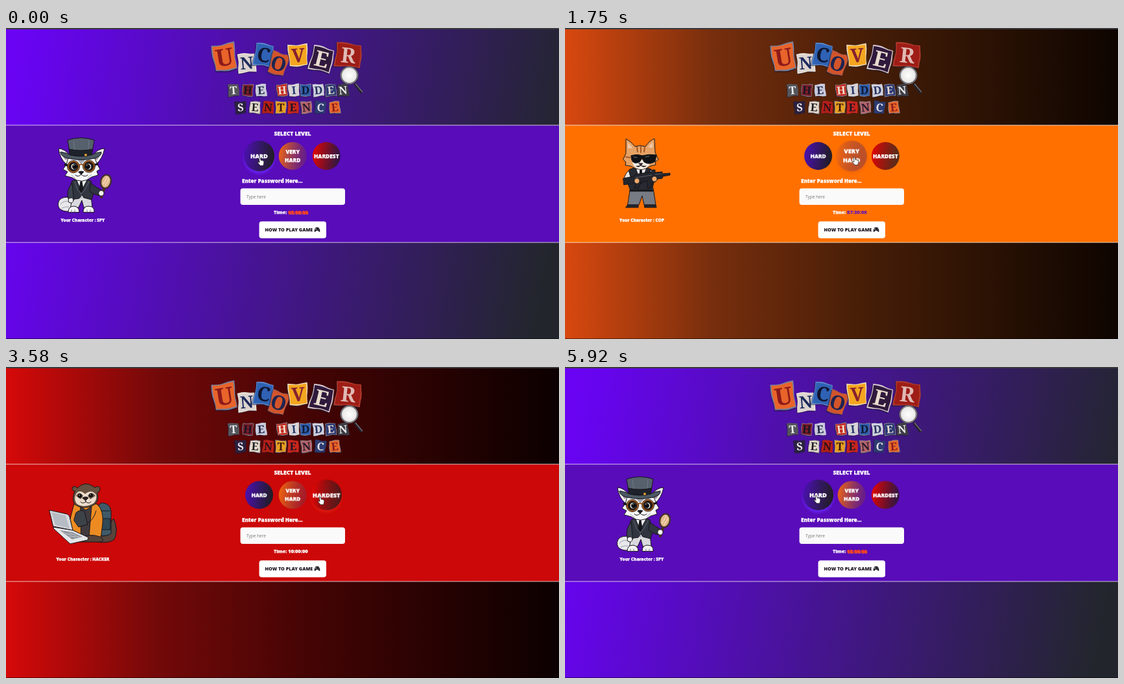
An HTML page that plays this animation: 853x480 px, repeating every 6000 ms.

```html
<!DOCTYPE html>
<html lang="en">
<head>
<meta charset="utf-8">
<title>Select level</title>
<style>
html, body { margin: 0; width: 100%; height: 100%; overflow: hidden; background: #000; }
svg { display: block; width: 100vw; height: 100vh; }
text { font-family: "Open Sans", "Noto Sans", sans-serif; font-weight: 800; fill: #fff; text-anchor: middle; }
.cut { font-family: "Noto Serif", "DejaVu Serif", serif; font-weight: 900; }
.left { text-anchor: start; }
.label { font-size: 6.5px; }
.time { font-size: 7.5px; text-anchor: start; }
.bold { stroke: #fff; stroke-width: .25; }
.line { stroke: #16161c; stroke-width: 1; stroke-linejoin: round; stroke-linecap: round; }

.theme { animation: 6s step-end infinite; }
.spy { animation-name: spy; }
.cop { animation-name: cop; }
.hacker { animation-name: hacker; }
@keyframes spy { 0% { opacity: 1 } 13.83% { opacity: 0 } 94.5% { opacity: 1 } }
@keyframes cop { 0% { opacity: 0 } 13.83% { opacity: 1 } 43% { opacity: 0 } 65.83% { opacity: 1 } 94.5% { opacity: 0 } }
@keyframes hacker { 0% { opacity: 0 } 43% { opacity: 1 } 65.83% { opacity: 0 } }

.btn, .glow { animation: 6s ease infinite; }
.btn text { font-size: 8.4px; }
.b1 .btn { animation-name: grow1; }
.b2 .btn { animation-name: grow2; }
.b3 .btn { animation-name: grow3; }
.b1 .glow { animation-name: glow1; }
.b2 .glow { animation-name: glow2; }
.b3 .glow { animation-name: glow3; }
@keyframes grow1 { 0%, 12.8% { transform: scale(1.1) } 15.2%, 82.8% { transform: none } 85.3%, 100% { transform: scale(1.1) } }
@keyframes grow2 { 0%, 8% { transform: none } 10.5%, 38.8% { transform: scale(1.1) } 41.3%, 61.5% { transform: none } 64%, 92.8% { transform: scale(1.1) } 95.2%, 100% { transform: none } }
@keyframes grow3 { 0%, 31.5% { transform: none } 34%, 64.2% { transform: scale(1.1) } 66.7%, 100% { transform: none } }
@keyframes glow1 { 0%, 12.8% { opacity: .9 } 15.2%, 82.8% { opacity: 0 } 85.3%, 93% { opacity: .3 } 95%, 100% { opacity: .9 } }
@keyframes glow2 { 0%, 8% { opacity: 0 } 10.5%, 38.8% { opacity: .6 } 41.3%, 61.5% { opacity: 0 } 64%, 92.8% { opacity: .6 } 95.2%, 100% { opacity: 0 } }
@keyframes glow3 { 0%, 31.5% { opacity: 0 } 34%, 64.2% { opacity: .6 } 66.7%, 100% { opacity: 0 } }

.hand { animation: point 6s ease-in-out infinite; }
@keyframes point {
  0%, 4.17% { transform: translate(393px, 206px) }
  10%, 26.67% { transform: translate(435px, 205px) }
  34.2%, 58.33% { transform: translate(490px, 205px) }
  59.67% { transform: translate(486px, 206px) }
  63.67%, 81.67% { transform: translate(443px, 205px) }
  85.3%, 91.67% { transform: translate(396px, 203px) }
  95%, 100% { transform: translate(389px, 204px) }
}
</style>
</head>
<body>
<svg viewBox="0 0 853 480" preserveAspectRatio="none">
<defs>
  <linearGradient id="violet" gradientUnits="userSpaceOnUse" x1="0" y1="0" x2="909" y2="160">
    <stop stop-color="#6b03f5"/><stop offset=".06" stop-color="#6604ee"/><stop offset=".96" stop-color="#22262c"/>
  </linearGradient>
  <linearGradient id="amber">
    <stop stop-color="#d8480f"/><stop offset=".27" stop-color="#762e0d"/><stop offset=".55" stop-color="#451d07"/><stop offset="1" stop-color="#0e0500"/>
  </linearGradient>
  <linearGradient id="crimson">
    <stop stop-color="#d60909"/><stop offset=".27" stop-color="#740909"/><stop offset=".55" stop-color="#440404"/><stop offset="1" stop-color="#0c0000"/>
  </linearGradient>
  <linearGradient id="hard" y2=".15"><stop stop-color="#4d10b8"/><stop offset="1" stop-color="#221d28"/></linearGradient>
  <linearGradient id="very" y2=".15"><stop stop-color="#fb6c0a"/><stop offset="1" stop-color="#7a3550" stop-opacity=".45"/></linearGradient>
  <linearGradient id="hardest" y2=".15"><stop offset=".1" stop-color="#dc0606"/><stop offset="1" stop-color="#2a1a20" stop-opacity=".78"/></linearGradient>
  <radialGradient id="lens"><stop stop-color="#fff"/><stop offset=".75" stop-color="#ecebea"/><stop offset="1" stop-color="#c9c6c4"/></radialGradient>
  <filter id="soft" x="-50%" y="-50%" width="200%" height="200%"><feGaussianBlur stdDeviation="2.5"/></filter>
</defs>

<g class="theme spy">
  <rect width="853" height="480" fill="url(#violet)"/>
  <rect y="150" width="853" height="181" fill="#590cb9"/>
  <g class="line">
    <path d="M101 262Q88 259 82 266Q78 275 84 280Q92 285 102 282Z" fill="#e9e9ec"/>
    <path d="M84 272Q89 266 96 268M86 278Q91 275 97 276" stroke="#9a9aa6" fill="none"/>
    <path d="M103 258H131L133 277H120L117 266L112 277H100Z" fill="#d9d9de"/>
    <path d="M102 236Q116 229 131 236L135 255L132 265L120 262L117 257L113 263L100 265L97 254Z" fill="#30353f"/>
    <path d="M109 235L116 252L125 235Z" fill="#f0f0f2"/>
    <path d="M115 237L113 249L116 254L119 249L117 237Z" fill="#15171d"/>
    <path d="M106 237L110 249L116 256L122 249L128 237M116 256V262" fill="none" stroke="#5f6774"/>
    <path d="M131 240Q140 246 148 251L144 259Q135 257 129 252Z" fill="#30353f"/>
    <path d="M102 240Q93 248 96 264L104 265Z" fill="#3d434f"/>
    <circle cx="100" cy="266" r="4" fill="#f4f4f5"/>
    <path d="M96 284Q96 275 105 275Q113 276 113 284ZM119 284Q119 275 127 275Q137 275 136 284Z" fill="#f4f4f5"/>
    <path d="M101 281v3M106 281v3M125 281v3M130 281v3" stroke="#777781"/>
    <path d="M93 210Q83 202 81 186Q90 186 100 198ZM139 210Q149 202 152 186Q142 186 132 198Z" fill="#f4f4f5"/>
    <path d="M92 204Q86 197 85 190Q91 192 97 199ZM140 204Q146 197 148 190Q142 192 135 199Z" fill="#9b8d98" stroke="none"/>
    <path d="M96 201H137L141 211L145 218L140 221L142 227L132 230Q117 242 102 231L91 228L95 222L88 218L93 211Z" fill="#f7f7f8"/>
    <path d="M110 203L116 210L122 203ZM101 227L107 232M132 226L126 231" fill="#a3a6b0" stroke="#a3a6b0"/>
    <path d="M99 197L95 173Q116 166 136 173L132 197Z" fill="#56616d"/>
    <path d="M104 174L106 188M128 173L127 187" stroke="#6f7a86"/>
    <path d="M97.500 187Q115 191 133.500 187L132 197H99Z" fill="#1d222b"/>
    <path d="M84 192Q90 191 99 196Q115 200 132 196Q141 191 147 192Q148 197 137 201Q116 206 95 201Q84 198 84 192Z" fill="#4c5863"/>
    <circle cx="123" cy="196" r="2.5" fill="#e2a83c"/>
    <path d="M91 211L98 213M141 210L134 212" stroke-width="3"/>
    <g fill="#231a15" stroke="#a3591b" stroke-width="2">
      <circle cx="104" cy="214" r="8.3"/><circle cx="128" cy="213.500" r="8.3"/>
      <path d="M112 212Q116 209 120 212" fill="none"/>
    </g>
    <g fill="none" stroke="#17120f" stroke-width=".8"><circle cx="104" cy="214" r="9.600"/><circle cx="128" cy="213.500" r="9.600"/></g>
    <circle cx="105" cy="214" r="5" fill="#f0ece6"/><circle cx="127" cy="214" r="5" fill="#f0ece6"/>
    <circle cx="106" cy="214" r="3.5" fill="#0b0b0d"/><circle cx="126" cy="214" r="3.5" fill="#0b0b0d"/>
    <path d="M104.500 212h.5M124.500 212h.5" stroke="#fff"/>
    <path d="M112 222Q116 220 120 222L116 226Z" fill="#16161c"/>
    <path d="M116 226Q111 231 107 227M116 226Q121 231 126 227" fill="none"/>
    <path d="M152 246L147 261" stroke="#4b2e20" stroke-width="4"/>
    <ellipse cx="154" cy="237" rx="7.8" ry="10.500" fill="#e2b78a" stroke="#40302b" stroke-width="2.4" transform="rotate(15 154 237)"/>
    <path d="M150 241L156 230M153 243L159 233" stroke="#f4dcc0" stroke-width="1.4"/>
    <circle cx="147" cy="255" r="4.2" fill="#f4f4f5"/>
  </g>
  <text class="label bold" x="118.5" y="299">Your Character : SPY</text>
  <text class="time" x="435" y="287" style="fill:#ff3b1c;text-shadow:.8px .8px 1px #ff6a1a">05:00:00</text>
</g>

<g class="theme cop">
  <rect width="853" height="480" fill="url(#amber)"/>
  <rect y="150" width="853" height="181" fill="#ff7000"/>
  <g class="line">
    <path d="M101 247H136L140 273H122L119 259L114 273H97Z" fill="#777b83"/>
    <path d="M97 273H113V277H94ZM123 273H140L141 277H123Z" fill="#25262b"/>
    <path d="M100 218Q116 211 133 218L138 234L134 251H101L95 235Z" fill="#272a31"/>
    <path d="M109 216L117 239L126 216Z" fill="#f1f1f2"/>
    <path d="M116 218L114 236L117 241L120 236L118 218Z" fill="#121318"/>
    <path d="M98 220Q89 229 92 240L104 241ZM132 219Q143 225 139 238L129 235Z" fill="#e9e5df"/>
    <path d="M94 193L94 171Q102 175 108 183Q116 180 124 183Q131 173 138 171L139 192L144 203L139 207L140 211L132 213Q118 224 101 213L93 212L94 207L90 203Z" fill="#e6a265"/>
    <path d="M97 186L97 176L104 185ZM135 185V176L128 184Z" fill="#f0c9ac" stroke="none"/>
    <path d="M104 208Q111 202 117 204Q126 202 132 208Q127 218 116 218Q107 217 104 208Z" fill="#f7efe6" stroke="none"/>
    <path d="M117 183V192M111 184L112 191M123 184L122 191M94 199L100 200M140 198L135 200" stroke="#a85722" stroke-width="2" fill="none"/>
    <path d="M102 197Q111 194 119 197Q130 194 141 196L139 206Q130 212 122 207L119 201L115 207Q106 211 103 204Z" fill="#101115"/>
    <path d="M106 199l5 1M124 199l6-1" stroke="#69717a"/>
    <path d="M114 209H120L117 212ZM117 212Q113 216 110 213M117 212Q121 216 125 213" fill="#3b2320"/>
    <path d="M90 232L106 229L108 226L133 222L135 219H139V223L150 222V225L162 224V227L151 229L150 232L137 234L132 247L127 247L127 236L117 238L113 247H107L109 239L91 242Z" fill="#24262c"/>
    <path d="M109 231L134 227M139 226L149 225" stroke="#5b6069"/>
    <circle cx="111" cy="236" r="4.2" fill="#eda96c"/><circle cx="138" cy="233" r="4.2" fill="#eda96c"/>
    <path d="M101 251H135" stroke="#15161a" stroke-width="3"/>
  </g>
  <text class="label bold" x="118.5" y="299">Your Character : COP</text>
  <text class="time" x="435" y="287" style="fill:#5a10c8">07:30:00</text>
</g>

<g class="theme hacker">
  <rect width="853" height="480" fill="url(#crimson)"/>
  <rect y="150" width="853" height="181" fill="#cc0808"/>
  <g class="line">
    <path d="M144 261Q165 262 161 247Q160 239 166 234Q174 252 167 266Q158 273 141 270Z" fill="#58443c"/>
    <path d="M142 215Q146 207 154 211Q163 214 162 228V257Q156 262 144 260Z" fill="#405a69"/>
    <path d="M146 234H161V251H146ZM147 222H160" fill="#314856"/>
    <path d="M105 212Q122 206 141 212Q151 222 149 242L146 266H106L99 235Z" fill="#ed8b22"/>
    <path d="M115 215L123 221L132 215L128 263H116Z" fill="#403a3f"/>
    <path d="M139 222Q135 237 124 242L118 236" fill="none"/>
    <path d="M116 264Q128 256 145 262Q153 267 147 270H112Z" fill="#574339"/>
    <path d="M106 192Q100 190 103 185Q107 183 110 187Q122 174 137 186Q144 182 145 188Q145 193 141 194Q145 211 131 215Q117 220 106 212Q101 204 106 192Z" fill="#66503f"/>
    <path d="M108 196Q113 188 122 196Q132 188 139 197Q141 208 132 212Q119 218 109 211Q104 204 108 196Z" fill="#ecdccb" stroke="none"/>
    <path d="M108 199Q113 190 119 199L115 204ZM126 199Q132 190 138 199L130 204Z" fill="#6b5344" stroke="none"/>
    <circle cx="114" cy="199" r="2.8" fill="#111"/><circle cx="131" cy="198" r="2.8" fill="#111"/>
    <path d="M113 198h.5M130 197h.5" stroke="#fff"/>
    <path d="M118 202Q123 199 127 202L123 206Z" fill="#2a2021"/>
    <path d="M123 206V208Q118 212 115 208M123 208Q128 212 131 208" fill="none"/>
    <path d="M108 225Q114 219 121 223L126 243L112 247L105 237Z" fill="#3d4248"/>
    <path d="M67 221L94 227Q97 228 98 231L103 252L73 246Z" fill="#d8dade"/>
    <path d="M70 224L92 229L98 249L76 244Z" fill="#b7bbc3" stroke="none"/>
    <path d="M73 247L103 252L127 263L126 267L99 273L74 250Z" fill="#e5e6e9"/>
    <path d="M83 252L103 255L118 262L102 266Z" fill="#8c9099" stroke="none"/>
    <path d="M87 254L108 264M96 255L113 263M90 258L109 258M96 262L116 261" stroke="#d2d4d9" stroke-width=".6"/>
  </g>
  <text class="label bold" x="118.5" y="299">Your Character : HACKER</text>
  <text class="time bold" x="435" y="287">10:00:00</text>
</g>

<path d="M0 150H853M0 331H853" stroke="#fff" stroke-width="1.2" stroke-opacity=".75"/>
<rect width="853" height="2" fill="#3b3b3e"/>
<rect y="479" width="853" height="1" fill="#000" opacity=".5"/>

<g id="title"></g>
<g>
  <path d="M538 86L549 100" stroke="#24222a" stroke-width="4"/>
  <path d="M539 86L550 99" stroke="#77757e" stroke-width="1.2"/>
  <circle cx="529.5" cy="73" r="13" fill="url(#lens)" stroke="#33323a" stroke-width="2.2"/>
  <circle cx="529.5" cy="73" r="13.2" fill="none" stroke="#aaa8ac" stroke-width=".9"/>
</g>

<text class="bold" x="442" y="165.5" font-size="8.5">SELECT LEVEL</text>
<g class="b1" transform="translate(390.5 197.5)">
  <circle class="glow" cy="4" r="23" fill="#6a2bff" filter="url(#soft)" opacity="0"/>
  <g class="btn"><circle r="21.5" fill="url(#hard)"/><text class="bold" y="3">HARD</text></g>
</g>
<g class="b2" transform="translate(442.2 197.5)">
  <circle class="glow" cy="4" r="23" fill="#e65f12" filter="url(#soft)" opacity="0"/>
  <g class="btn"><circle r="21.5" fill="url(#very)"/><text class="bold" y="-4">VERY</text><text class="bold" y="9">HARD</text></g>
</g>
<g class="b3" transform="translate(494.3 197.5)">
  <circle class="glow" cy="4" r="23" fill="#ee2a12" filter="url(#soft)" opacity="0"/>
  <g class="btn"><circle r="21.5" fill="url(#hardest)"/><text class="bold" y="3">HARDEST</text></g>
</g>

<text class="left bold" x="364" y="239" font-size="8.1">Enter Password Here...</text>
<rect x="361.5" y="247.5" width="161.5" height="25.5" rx="4" fill="#fafafa"/>
<text class="left" x="371" y="262.5" style="font-size:6.5px;font-weight:400;fill:#777">Type here</text>
<text class="left bold" x="413" y="287" font-size="7.2">Time:</text>
<rect x="390.5" y="298.5" width="103.5" height="26" rx="4" fill="#fff"/>
<text class="left" x="399.5" y="314" style="font-size:7.2px;fill:#18101c">HOW TO PLAY GAME</text>
<path d="M477.500 308Q480 307 482.500 308Q484.500 311 484.500 314Q483 316 481.500 312.800H478.500Q477 316 475.500 314Q475.500 311 477.500 308Z" fill="#22202a"/>
<path d="M477 310.300h2M478 309.300v2M482 309.500h.5M481.200 311h.5" stroke="#fff" stroke-width=".6"/>

<g class="hand">
  <path d="M-2.800 -5.500Q-1.600 -6.700 -.8 -5.300L.3 -1.500L1.300 -2L2.600 -1.200L3.700 -1.300L4.800 .3Q5.300 3 3.600 6.500H-.6Q-2.300 4.600 -4.300 2.200Q-4.700 .6 -3.200 .9L-2 1.800Z" fill="#fff" stroke="#222" stroke-width=".8" stroke-linejoin="round"/>
</g>
</svg>

<script>
const title = document.getElementById('title');

// Torn paper outline: a rectangle whose edge points wobble by a fixed rule.
function tear(w, h, seed, rough) {
  const pts = [];
  for (let i = 0; i < 20; i++) {
    const a = i / 20 * Math.PI * 2 + Math.PI / 4;
    const c = Math.cos(a), s = Math.sin(a), m = Math.max(Math.abs(c), Math.abs(s));
    const k = 1 + Math.sin(seed * 7 + i * 5.3) * rough;
    pts.push((c / m * w / 2 * k).toFixed(1) + ',' + (s / m * h / 2 * k).toFixed(1));
  }
  return pts.join(' ');
}

function scrap(ch, x, y, w, h, turn, paper, ink, edge) {
  const seed = x + y, size = h * .9;
  const outer = tear(w, h, seed, .07), inner = tear(w * .91, h * .91, seed, .05);
  title.insertAdjacentHTML('beforeend',
    `<g transform="translate(${x} ${y}) rotate(${turn})">
      <polygon points="${outer}" fill="#1c1a30" opacity=".55" transform="translate(-1 ${h / 22})"/>
      <polygon points="${outer}" fill="${edge}"/><polygon points="${inner}" fill="${paper}"/>
      <text class="cut" y="${size * .36}" style="font-size:${size}px;fill:${ink}">${ch}</text>
    </g>`);
}

[
  ['U', 337, 45, 35, 41, -9, '#e8642a', '#8c1a1a', '#78809c'],
  ['N', 371.5, 54, 27, 29, -5, '#ddd4cf', '#1c2a5c', '#eee6dc'],
  ['C', 397.5, 41.5, 28, 34, 9, '#2f62b4', '#10152e', '#5f8ccc'],
  ['O', 420.5, 55, 26, 34, 17, '#d4542a', '#1d2450', '#a8584a'],
  ['V', 450.5, 42, 29, 33, -4, '#f4a51f', '#86202e', '#f0dfc0'],
  ['E', 487, 48, 33, 37, 14, '#30193c', '#e8dccf', '#d9cdd2'],
  ['R', 528, 42, 39, 36, 6, '#9e1d16', '#e0b9b4', '#b03a2c']
].forEach(a => scrap(...a));

const rows = [
  [96, 'THEHIDDEN', [
    [351, '#55555c', '#eeeeee'], [373, '#7c1c2a', '#191522'], [393.500, '#c9cadb', '#1d2444'],
    [426, '#c42a20', '#f0e2d0'], [444, '#d8d4d6', '#22356c'], [462, '#2d5fae', '#12172e'],
    [482, '#cfd0dc', '#24305e'], [501, '#2c3a74', '#e6d9d0'], [520, '#3d3c45', '#f0f0f0']]],
  [122.5, 'SENTENCE', [
    [362, '#2a2140', '#e8e2e6'], [384, '#e4dacb', '#1b1a22'], [404.500, '#b51f18', '#2a1018'],
    [424, '#e9a020', '#38140f'], [443, '#c8261c', '#1c1426'], [463.500, '#b4646a', '#241628'],
    [485, '#2c3c72', '#e4e0e4'], [507, '#e7672a', '#8c1b1b']]]
];
for (const [y, word, scraps] of rows)
  scraps.forEach(([x, paper, ink], i) =>
    scrap(word[i], x, y, 16.5, 18.5, Math.sin(x) * 6, paper, ink, i % 2 ? '#8b8794' : paper));
</script>
</body>
</html>
```
